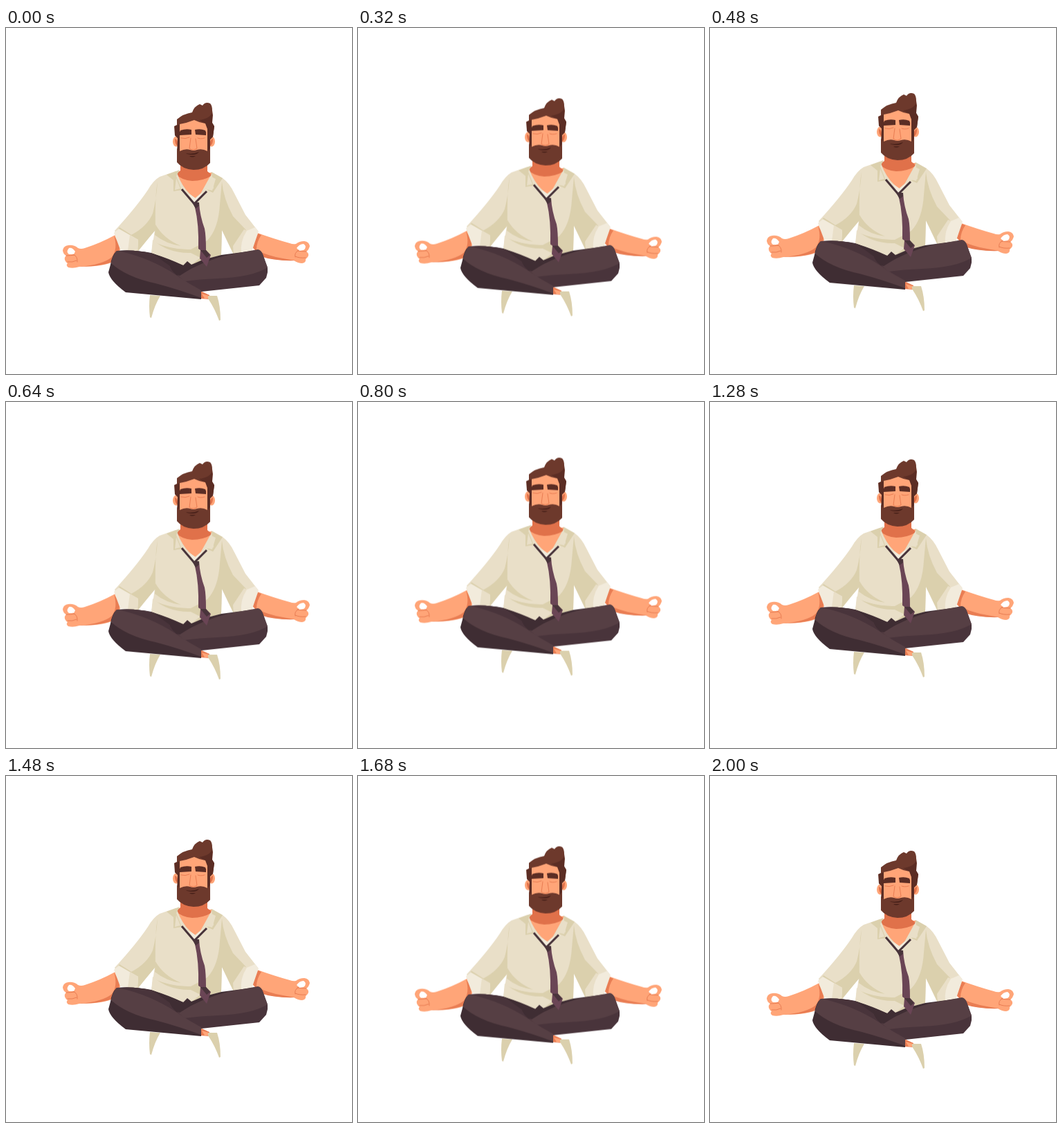
Recreate the animation shown at these times as an HTML page. Size 500 by 500 pixels, loop 6040 ms.

```html
<!DOCTYPE html>
<html lang="en">
<head>
<meta charset="utf-8">
<title>Floating meditation</title>
<style>
  html, body { margin: 0; width: 100%; height: 100%; overflow: hidden; background: #fff; }
  svg { display: block; width: 100%; height: 100%; }
  #man { animation: float 2s ease-in-out paused both; }
  @keyframes float {
    50% { transform: translateY(-30px); }
  }
  .skin { fill: #ffa578; }
  .skin-shade { fill: #e97d53; }
  .neck-shade { fill: #e0714a; }
  .hair { fill: #6d392c; }
  .hair-dark { fill: #5b2d24; }
  .shirt { fill: #e9dfc8; }
  .shirt-shade { fill: #dbd0ad; }
  .cuff { fill: #f2ebdc; }
  .cloth { fill: #563f44; }
  .cloth-mid { fill: #49343b; }
  .cloth-dark { fill: #3f2d33; }
  .tie { fill: #6a4555; }
  .line { fill: none; stroke: #e97d53; stroke-width: 1; stroke-linecap: round; }
</style>
</head>
<body>
<svg viewBox="0 0 500 500">
  <g id="man">
    <g id="feet">
      <path class="shirt-shade" d="M208 386L223 387Q215 400 210 419L208 418Q206 402 208 386Z"/>
      <path class="skin-shade" d="M281 380L294 386V392L281 391Z"/>
      <path class="skin" d="M283 384L293 387V391L287 391Z"/>
      <path class="shirt-shade" d="M292 387L305 387Q310 402 310 422L308 423Q302 406 292 391Z"/>
    </g>

    <g id="left-arm">
      <path class="skin" fill-rule="evenodd" d="M158 299Q136 311 114 318Q108 320 104 318Q98 313 90 314Q83 315 82 321Q82 326 87 329Q83 332 86 337Q87 339 89 340Q86 343 90 346Q97 348 106 345Q144 345 158 336L166 318ZM91 318Q96 317 100 323L98 327L91 327Q86 324 91 318Z"/>
      <path class="skin-shade" d="M156 300L165 314L160 334Q148 344 106 345Q140 342 153 331Q162 319 156 300Z"/>
      <path class="line" d="M87 329Q94 329 99 328M89 338Q96 339 102 336M97 327Q104 330 103 338"/>
    </g>
    <g id="right-arm">
      <path class="skin" fill-rule="evenodd" d="M363 296Q388 305 410 311Q415 313 419 312Q424 308 431 308Q438 309 439 315Q438 320 434 323Q439 326 436 331L433 334Q434 339 428 340Q422 340 416 336Q390 336 369 330L355 316ZM430 312Q424 312 420 318L424 322L430 321Q436 316 430 312Z"/>
      <path class="skin-shade" d="M364 297L369 299Q362 309 362 320Q370 326 390 331Q405 334 418 336Q388 337 368 330L356 316Z"/>
      <path class="line" d="M434 323Q427 323 421 322M433 332Q424 333 418 330M423 321Q416 325 418 331"/>
    </g>

    <g id="shirt">
      <path class="shirt" d="M222 215L245 207L272 230L297 208L313 217Q323 224 330 239L346 270L364 293L355 323L329 328L312 292L311 328L285 335L268 342L262 337L256 343L210 326L215 292L190 324L165 313L157 293Q189 258 205 234Q213 220 222 215Z"/>
      <path class="shirt-shade" d="M219 222Q215 242 216 292L190 323L181 299Q204 287 212 268Q217 250 219 222Z"/>
      <path class="shirt-shade" d="M164 288L186 302L182 306L160 293Z"/>
      <path class="shirt-shade" d="M312 222Q314 246 328 272L347 292L329 327L312 292L311 328L284 335L268 342L262 337L213 309Q240 321 267 320Q279 314 291 307Q307 290 309 255Z"/>
      <path class="shirt" d="M212 306Q235 326 267 325L281 332L268 342L262 337L256 343L210 326Z"/>
      <path class="shirt-shade" d="M216 284Q228 305 253 315Q231 312 215 299Z"/>
      <path class="cuff" d="M163 290L191 306L190 324L165 320L156 296Z"/>
      <path class="shirt" d="M179 299L191 306L190 324L176 322Z"/>
      <path class="shirt" d="M328 315L344 291L350 294L341 326L329 328Z"/>
      <path class="cuff" d="M360 288L365 294L355 323L340 326Q338 308 348 293Z"/>
    </g>

    <g id="neck">
      <path class="skin" d="M246 209L298 209L277 247L270 246Q255 232 246 209Z"/>
      <path class="neck-shade" d="M252 192H291V207L298 213Q285 221 269 221Q254 220 245 211L252 206Z"/>
      <path class="shirt" d="M246 207L251 219Q259 236 273 246L286 235L297 211L304 215L299 238L290 235L274 254L254 234L242 236V210Z"/>
      <path class="shirt-shade" d="M232 212L251 205L246 214L254 234L242 236V220ZM297 208L313 217L299 238L290 234L300 232Z"/>
      <path class="shirt" d="M246 217L252 232L244 234ZM297 215L303 218L298 235L291 233Z"/>
      <path class="cuff" d="M264 239L274 246L284 237L276 253H272Z"/>
    </g>

    <g id="trousers">
      <path class="cloth-dark" d="M160 322Q186 320 210 325L256 343L262 337L268 342L284 335L311 328L364 321L330 350L282 380L240 362Z"/>
      <path class="cloth-mid" d="M244 358L364 321Q369 322 371 327L378 347V353L376 361L366 372L282 381Z"/>
      <path class="cloth" d="M249 358Q284 337 320 328L364 320Q369 321 371 327L378 346Q356 360 306 362Q279 363 258 366Z"/>
      <path class="cloth-dark" d="M160 322Q153 328 151 342L148 353Q150 365 173 382L282 392V380L230 352Z"/>
      <path class="cloth" d="M160 322Q188 320 211 326L237 341Q237 350 246 357Q263 369 282 379V390Q250 378 216 369Q174 360 152 340Q154 328 160 322Z"/>
      <path class="cloth-mid" d="M162 322Q188 320 211 326L237 341Q237 350 246 357Q208 332 162 322Z"/>
      <path class="cloth-dark" d="M212 326Q235 333 256 343L278 341L251 358Q237 349 237 344Z"/>
    </g>

    <g id="tie">
      <path d="M254 233L272 254L290 236" fill="none" stroke="#463239" stroke-width="3"/>
      <path class="tie" d="M270 252H279Q280 271 287 290Q289 300 289 321L296 328L290 345L280 333L281 321L278 319Q279 284 273 259Z"/>
      <path class="cloth-mid" d="M269 252H279L279 257L274 261ZM281 321L289 321L295 328L290 332Z"/>
    </g>

    <g id="head">
      <ellipse class="skin" cx="246" cy="164" rx="5" ry="7.5"/>
      <ellipse class="skin" cx="297" cy="164" rx="5" ry="7.5"/>
      <path class="neck-shade" d="M244 160Q249 161 248 170Q244 169 244 160ZM299 160Q294 161 295 170Q299 169 299 160Z"/>
      <path class="hair" d="M247 180L248 159L244 155L243 142L247 140L247 132Q256 124 269 122Q272 113 280 110L284 112Q288 106 295 109Q298 112 298 119L299 126L298 137L301 142L299 157L295 161V181Z"/>
      <path class="hair-dark" d="M244 142L251 139L252 178H248V159L244 155ZM298 122Q295 131 279 133L288 138L291 178H295V161L299 157L301 142L298 137Z"/>
      <path class="skin" d="M251 139Q262 137 272 133Q280 137 288 138L291 146V181H251Z"/>
      <path class="hair-dark" d="M252 148Q260 145 268 147V154L251 155Q250 151 252 148ZM273 147Q281 145 288 148Q290 151 289 155L274 154Z"/>
      <path class="line" d="M253 159Q259 161 265 158M277 159Q281 161 287 159"/>
      <path class="line" d="M267 159L265 174Q270 178 276 174L274 160"/>
      <path class="hair" d="M247 174L251 178Q259 174 266 176Q271 178 276 176Q284 174 291 178L295 174V195Q286 205 271 205Q255 204 247 194Z"/>
      <path d="M260 181Q270 183 279 179Q276 183 270 183Q263 183 260 181ZM265 185H274Q269 188 265 185Z" fill="#472019"/>
    </g>
  </g>
</svg>
<script>
  const LOOP = 6040, RISE_AND_FALL = 2000, STEP = 40;
  const [float] = document.getElementById('man').getAnimations();

  function draw() {
    const time = performance.now() % LOOP;
    float.currentTime = Math.min(Math.floor(time / STEP) * STEP, RISE_AND_FALL);
    requestAnimationFrame(draw);
  }
  draw();
</script>
</body>
</html>
```
